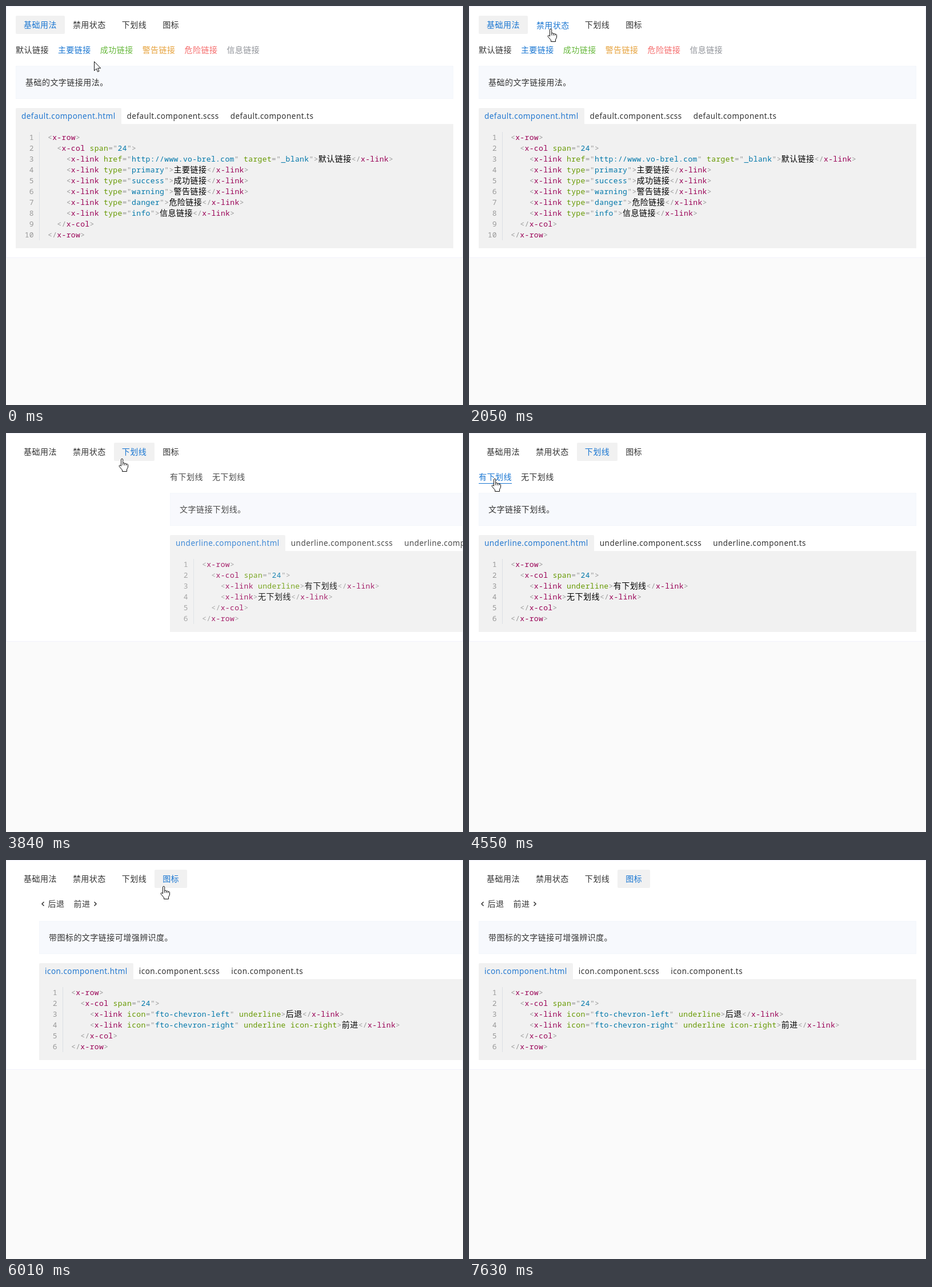
Animation, 800 px wide and 700 px high, one loop 8.09 s. Source, as an HTML page:

```html
<!DOCTYPE html>
<html lang="zh-CN">
<head>
<meta charset="utf-8">
<style>
html, body { margin: 0; width: 100%; height: 100%; overflow: hidden; background: #fafafa; }
body { position: relative; color: #333; font: 14px "Noto Sans", "Noto Sans CJK SC", "Noto Sans CJK", sans-serif; letter-spacing: .467px; white-space: pre; }
#card { position: absolute; left: 0; top: 0; width: 800px; box-sizing: border-box; background: #fff; border: 1px solid #f1f1fb; }
#nav { position: absolute; left: 17px; top: 17px; display: flex; line-height: 32px; }
.tab { padding: 0 14px; border-radius: 2px; }
.tab span { display: block; }
.tab, .link { color: color-mix(in srgb, var(--hot) var(--h, 0%), var(--c)); }
.tab { --c: #333; --hot: #1976d2; }
.tab.on { --c: #1976d2; background: #f1f1f1; }
.page { position: absolute; left: 17px; top: 0; width: 766px; }
.page > * { position: absolute; left: 0; }
.links { top: 66px; display: flex; gap: 16px; line-height: 22px; }
.link { display: flex; align-items: center; gap: 1.5px; }
.link svg { width: 14px; height: 14px; fill: none; stroke: currentColor; stroke-width: 1.5; }
.off { opacity: .5; }
.desc { width: 766px; box-sizing: border-box; padding: 13px 16px; line-height: 30px; background: #f7f9fd; border: 1px solid #f3f6fb; }
.item { padding-left: 20px; position: relative; }
.item::before { content: ""; position: absolute; left: 5px; top: 14px; width: 4px; height: 4px; background: #333; }
code, .code { font: 13px "Noto Sans Mono", "Noto Sans CJK SC", "Noto Sans CJK", monospace; letter-spacing: .367px; }
code { display: inline-block; margin: 0 4px; padding: 0 4px; line-height: 17px; background: #eff4fb; border: 1px solid #e2eaf5; border-radius: 2px; }
.files { display: flex; line-height: 28px; font-size: 13.5px; }
.files span { padding: 0 10px; }
.files span:first-child { color: #2378d0; background: #f1f1f1; border-radius: 2px 2px 0 0; }
.code { width: 766px; box-sizing: border-box; padding: 14px 0; background: #f1f1f1; }
.line { display: flex; height: 19px; line-height: 19px; color: #000; }
.no { width: 32px; padding-right: 9px; margin-right: 14px; border-right: 1px solid #dcdfe4; text-align: right; color: #999; }
.p { color: #999; } .t { color: #905; } .a { color: #690; } .v { color: #07a; }
.zh { font-size: 14px; letter-spacing: .467px; line-height: 0; }
#pointer { position: absolute; left: 0; top: 0; width: 20px; height: 26px; overflow: visible; fill: #fff; stroke: #111; stroke-linejoin: round; }
</style>
</head>
<body>
<div id="card"></div>
<div id="nav"></div>
<div id="pages"></div>
<svg id="pointer">
  <path id="arrow" d="M.5 .5V16.5L4.2 13 6.5 18.4 8.9 17.4 6.6 12.1H11.7Z"/>
  <path id="hand" transform="translate(-6 -1)" d="M4.5 14V2.8a1.6 1.6 0 0 1 3.2 0V8.6q2.8-.8 3 .8 2.6-.6 2.9 .9 2.7-.4 2.9 1.6V16l-2 4v3.5H6.5V21L1.3 14.8q-.8-2.4 1.4-2.3ZM7.7 8.6v4M10.7 9.4v3.4M13.6 10.3v2.6"/>
</svg>
<script>
const LOOP = 8090, SLIDE = 300, FADE = 200;
const BLUE = '#1976d2';
const tabNames = ['基础用法', '禁用状态', '下划线', '图标'];
const tabEdges = [17, 102.9, 188.7, 260.1, 317];
const kinds = ['主要', '成功', '警告', '危险', '信息'];
const types = ['primary', 'success', 'warning', 'danger', 'info'];
const typeColors = [BLUE, '#67b83c', '#e6a23c', '#f56c6c', '#909399'];
const labels = ['默认链接', ...kinds.map(k => k + '链接')];
const underlined = ['有下划线', '无下划线'];

const tag = (attrs, text) => `<x-link${attrs}>${text}</x-link>`;
const typed = extra => types.map((type, i) => tag(` type="${type}"${extra}`, labels[i + 1]));
const chevron = d => `<svg viewBox="0 0 14 14"><path d="${d}"/></svg>`;

const pages = [
  { name: 'default', start: 0, top: 105, descHeight: 58, linkWidth: 57.87,
    links: labels, colors: ['#333', ...typeColors], desc: '基础的文字链接用法。',
    code: [tag(' href="http://www.vo-brel.com" target="_blank"', labels[0]), ...typed('')] },
  { name: 'disabled', start: 2130, top: 105, descHeight: 95, linkWidth: 57.87, off: true,
    links: labels, colors: ['#808590', ...typeColors],
    desc: '不可用的状态。<div class="item">使用<code>disabled</code>属性来禁用链接。</div>',
    code: [tag(' disabled', labels[0]), ...typed(' disabled')] },
  { name: 'underline', start: 3719, top: 105, descHeight: 58, linkWidth: 57.87,
    links: underlined, lines: [true, false], desc: '文字链接下划线。',
    code: [tag(' underline', underlined[0]), tag('', underlined[1])] },
  { name: 'icon', start: 5780, top: 107, descHeight: 58, linkWidth: 44.4,
    links: [chevron('M8.5 3.5L5 7l3.5 3.5') + '后退', '前进' + chevron('M5.5 3.5L9 7l-3.5 3.5')],
    lines: [true, true], desc: '带图标的文字链接可增强辨识度。',
    code: [tag(' icon="fto-chevron-left" underline', '后退'),
           tag(' icon="fto-chevron-right" underline icon-right', '前进')] }
];

// Pointer stops: time, x, y
const path = [
  [0, 154, 97], [70, 154, 97], [400, 136, 82], [900, 136, 82], [1450, 143, 40],
  [2300, 143, 40], [2440, 206, 37], [2740, 206, 37], [2900, 215, 58], [3060, 203, 45],
  [4160, 203, 45], [4400, 45, 80], [4700, 45, 80], [4900, 112, 80], [5120, 112, 80],
  [5320, 241, 44], [5500, 241, 44], [5720, 276, 46], [6100, 276, 46], [6330, 48, 80],
  [6450, 48, 80], [6620, 96, 80], [6880, 96, 80], [7600, 728, 705], [LOOP, 728, 705]
];

const span = (cls, text) => `<span class="${cls}">${text}</span>`;
const escape = s => s.replace('<', '&lt;').replace('>', '&gt;');

function highlight(source) {
  const token = /(<\/?)([\w-]+)|="([^"]*)"|([\w-]+)|(>)|([\u4e00-\u9fff]+)/g;
  return source.replace(token, (all, open, name, value, attr, close, text) =>
    open ? span('p', escape(open)) + span('t', name) :
    value ? span('p', '="') + span('v', value) + span('p', '"') :
    attr ? span('a', attr) :
    close ? span('p', '&gt;') : span('zh', text));
}

function linkHtml(page, text, i) {
  const color = page.colors?.[i] ?? '#333';
  const hot = color === '#333' ? BLUE : `color-mix(in srgb, ${color} 70%, white)`;
  return `<div class="link" style="--c:${color};--hot:${hot}">${text}</div>`;
}

function pageHtml(page) {
  const lines = ['<x-row>', '  <x-col span="24">', ...page.code.map(s => '    ' + s), '  </x-col>', '</x-row>'];
  const filesTop = page.top + page.descHeight + 16;
  page.height = filesTop + 28 + 28 + 19 * lines.length + 17;
  return `<div class="page"><div class="links${page.off ? ' off' : ''}">` +
    page.links.map((text, i) => linkHtml(page, text, i)).join('') + '</div>' +
    `<div class="desc" style="top:${page.top}px;height:${page.descHeight}px">${page.desc}</div>` +
    `<div class="files" style="top:${filesTop}px">` +
    ['html', 'scss', 'ts'].map(ext => `<span>${page.name}.component.${ext}</span>`).join('') + '</div>' +
    `<div class="code" style="top:${filesTop + 28}px">` +
    lines.map((s, i) => `<div class="line">${span('no', i + 1)}<div>${highlight(s)}</div></div>`).join('') +
    '</div></div>';
}

const $ = id => document.getElementById(id);
$('nav').innerHTML = tabNames.map(name => `<div class="tab"><span>${name}</span></div>`).join('');
$('pages').innerHTML = pages.map(pageHtml).join('');
const tabs = [...document.querySelectorAll('.tab')];
const views = [...document.querySelectorAll('.page')];
const links = views.map(view => [...view.querySelectorAll('.link')]);

const pageAt = t => pages.findLastIndex(page => t >= page.start);

function pointerAt(t) {
  const i = Math.max(1, path.findIndex(stop => stop[0] > t));
  const [t0, x0, y0] = path[i - 1], [t1, x1, y1] = path[i];
  const u = (t - t0) / (t1 - t0), k = u * u * (3 - 2 * u);
  return [x0 + (x1 - x0) * k, y0 + (y1 - y0) * k];
}

// Name of the tab or link under the pointer
function targetAt(t) {
  const [x, y] = pointerAt(t);
  if (y >= 17 && y < 49) {
    const i = tabEdges.findLastIndex(edge => x >= edge);
    return i >= 0 && i < tabs.length ? 'tab' + i : '';
  }
  if (y < 66 || y >= 89 || x < 17) return '';
  const p = pageAt(t), page = pages[p], pitch = page.linkWidth + 16;
  const i = Math.floor((x - 17) / pitch);
  return i < page.links.length && (x - 17) % pitch < page.linkWidth ? `link${p}-${i}` : '';
}

function draw(t) {
  const current = pageAt(t), page = pages[current];
  const target = targetAt(t);
  const recent = Array.from({ length: 10 }, (_, k) => targetAt(Math.max(0, t - k * FADE / 10)));
  const heat = key => recent.filter(name => name === key).length * 10 + '%';

  $('card').style.height = page.height + 'px';
  tabs.forEach((tab, i) => {
    const lead = pages[i].start - t;
    tab.classList.toggle('on', i === current);
    tab.style.setProperty('--h', heat('tab' + i));
    tab.firstChild.style.transform = lead > 0 && lead < 150 ? 'translate(1px, 1px)' : '';
  });

  // The new page slides in from the right; it fades in faster than it moves
  const left = current ? Math.max(0, 1 - (t - page.start) / SLIDE) ** 2 : 0;
  views.forEach((view, i) => view.style.display = i === current ? '' : 'none');
  views[current].style.transform = left ? `translateX(${Math.round(766 * left)}px)` : '';
  views[current].style.opacity = 1 - left ** 2;
  links[current].forEach((link, i) => {
    const key = `link${current}-${i}`;
    link.style.setProperty('--h', heat(key));
    link.style.boxShadow = page.lines?.[i] && target === key ? '0 1px ' + BLUE : '';
  });

  const [x, y] = pointerAt(t).map(Math.round);
  $('pointer').style.transform = `translate(${x}px, ${y}px)`;
  $('hand').style.display = target ? '' : 'none';
  $('arrow').style.display = target ? 'none' : '';
}

const begin = performance.now();
function tick() {
  draw((performance.now() - begin) % LOOP);
  requestAnimationFrame(tick);
}
tick();
</script>
</body>
</html>
```
